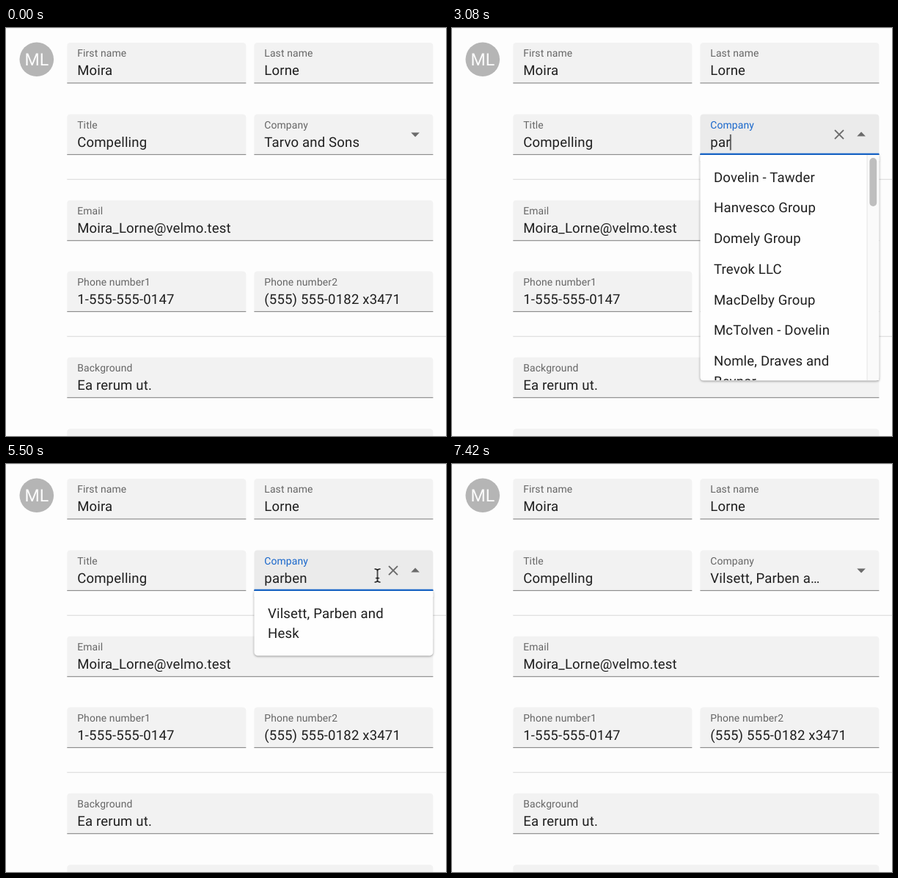
An HTML page for the animation above (8010 ms loop, 600 by 556 pixels).

```html
<!DOCTYPE html>
<html lang="en">
<head>
<meta charset="utf-8">
<title>Contact form</title>
<style>
html, body { margin: 0; width: 100%; height: 100%; overflow: hidden; background: #fdfdfd; }
svg { display: block; width: 600px; height: 556px; }
text {
  font: 18.56px Roboto, Arial, sans-serif;
  letter-spacing: .00938em;
  fill: #1f1f1f;
  white-space: pre;
  text-rendering: geometricPrecision;
}
text.label { font-size: 13.92px; fill: #666; }
text.initials { font-size: 23.2px; letter-spacing: 0; fill: #fcfcfc; text-anchor: middle; }
.popup { filter: drop-shadow(0 1px 1.6px rgba(0, 0, 0, .38)); }
.focus { transform-box: fill-box; transform-origin: center; }
</style>
</head>
<body>
<svg id="stage" viewBox="0 0 600 556"></svg>
<script>
const LOOP = 8010;
const stage = document.getElementById('stage');
const LEFT = 83.3, RIGHT = 338.4, HALF = 244, FULL = 499.1, HEIGHT = 55.5, PAD = 13.9;
const FILL = '#f2f2f2', HOVER = '#e4e4e4', ACTIVE = '#ebebeb';
const LINE = '#8c8c8c', DARK = '#222222', BLUE = '#1967cb', ICON = '#6b6b6b';

// Moments of the story, in ms
const ENTER = 330, PRESS = 1250, OPEN = 1330, FILTER = 5080, RETURN = 5500, PICK = 6420, LEAVE = 7170, GONE = 7330;

function add(tag, attrs, parent = stage) {
  const el = document.createElementNS('http://www.w3.org/2000/svg', tag);
  for (const key in attrs) el.setAttribute(key, attrs[key]);
  parent.append(el);
  return el;
}

function rect(x, y, width, height, fill, parent, more) {
  return add('rect', { x, y, width, height, fill, ...more }, parent);
}

function text(x, y, words, parent, cls = '') {
  const el = add('text', { x, y, class: cls }, parent);
  el.textContent = words;
  return el;
}

// steps: [ms, value, easing towards the next step]
const animations = [];
function play(el, prop, steps) {
  const frames = steps.map(([ms, value, easing = 'step-end']) => ({ offset: ms / LOOP, [prop]: value, easing }));
  frames.push({ offset: 1, [prop]: steps[steps.length - 1][1] });
  animations.push(el.animate(frames, { duration: LOOP, iterations: Infinity }));
}

function show(el, ...spans) {
  const steps = spans[0][0] ? [[0, 0]] : [];
  for (const [from, to] of spans) {
    steps.push([from, 1]);
    if (to < LOOP) steps.push([to, 0]);
  }
  play(el, 'opacity', steps);
}

function shift(el, prop, start, changes, time = 200) {
  const steps = [[0, start]];
  let last = start;
  for (const [ms, value] of changes) {
    steps.push([ms, last, 'ease-out'], [ms + time, value]);
    last = value;
  }
  play(el, prop, steps);
}

function field(x, y, width, label, value) {
  const r = 4.6;
  const box = add('path', {
    d: `M${x} ${y + HEIGHT}v${r - HEIGHT}q0 ${-r} ${r} ${-r}h${width - 2 * r}q${r} 0 ${r} ${r}v${HEIGHT - r}z`,
    fill: FILL
  });
  const line = rect(x, y + HEIGHT - 1.1, width, 1.15, LINE);
  const title = text(x + PAD, y + 19.4, label, stage, 'label');
  if (value) text(x + PAD, y + 44, value);
  return { box, line, title };
}

// Form
rect(0, 0, 600, 1, '#f4f4f4');
add('circle', { cx: 41.8, cy: 42.8, r: 23.3, fill: '#b5b5b5' });
text(41.8, 50.8, 'ML', stage, 'initials');
for (const y of [205.7, 419.7]) rect(LEFT, y, 520, 1.15, '#dcdcdc');

const ROW = [20, 117.5, 234.7, 331.5, 448.7, 546.2];
field(LEFT, ROW[0], HALF, 'First name', 'Moira');
field(RIGHT, ROW[0], HALF, 'Last name', 'Lorne');
field(LEFT, ROW[1], HALF, 'Title', 'Compelling');
const company = field(RIGHT, ROW[1], HALF, 'Company');
const email = field(LEFT, ROW[2], FULL, 'Email', 'Moira_Lorne@velmo.test');
field(LEFT, ROW[3], HALF, 'Phone number1', '1-555-555-0147');
field(RIGHT, ROW[3], HALF, 'Phone number2', '(555) 555-0182 x3471');
field(LEFT, ROW[4], FULL, 'Background', 'Ea rerum ut.');
field(LEFT, ROW[5], FULL, '');

// Company field
shift(company.box, 'fill', FILL, [[ENTER, HOVER], [PRESS, ACTIVE], [PICK, FILL]]);
shift(company.line, 'fill', LINE, [[ENTER, DARK], [PICK, LINE]]);
shift(company.title, 'fill', '#666666', [[PRESS, BLUE], [PICK, '#666666']]);

const focusLine = rect(RIGHT, ROW[1] + HEIGHT - 2.3, HALF, 2.3, BLUE, stage, { class: 'focus' });
shift(focusLine, 'transform', 'scaleX(0)', [[PRESS, 'scaleX(1)'], [PICK, 'scaleX(0)']]);

const textX = RIGHT + PAD, textY = ROW[1] + 44;
const selection = rect(textX, 142, 10, 26.5, '#b5bfca');
show(selection, [OPEN, 2330]);

const typed = [
  [0, 'Tarvo and Sons'], [2330, 'p'], [2830, 'pa'], [3000, 'par'],
  [3500, 'parb'], [3670, 'parbe'], [4000, 'parben'], [PICK, 'Vilsett, Parben a…']
];
const caretSteps = [];
typed.forEach(([from, words], i) => {
  const el = text(textX, textY, words);
  const width = el.getComputedTextLength();
  if (!i) selection.setAttribute('width', width);
  caretSteps.push([from, `translateX(${width}px)`]);
  show(el, [from, i + 1 < typed.length ? typed[i + 1][0] : LOOP]);
});
const caret = rect(textX - .4, 145, 1.3, 21.5, '#1a1a1a');
play(caret, 'transform', caretSteps);
show(caret, [2330, 4500], [5000, 5500], [6000, PICK]);

const clear = add('path', { d: 'M522 139.2l12 12m0-12l-12 12', stroke: ICON, 'stroke-width': 1.9 });
show(clear, [ENTER, PICK]);
const down = add('path', { d: 'M552.3 142.6h11.6l-5.8 5.8z', fill: ICON });
const up = add('path', { d: 'M552.3 147.4h11.6l-5.8-5.8z', fill: ICON });
show(down, [0, OPEN], [PICK, LOOP]);
show(up, [OPEN, PICK]);

// Popups
const OPTION_X = RIGHT + 18.6, FIRST = 209.5, PITCH = 41.76, WRAP = 27.84;
function popup(height) {
  const group = add('g', { class: 'popup' });
  rect(RIGHT, 173, HALF, height, '#fefefe', group, { rx: 4.6 });
  rect(RIGHT, 173, HALF, 8, '#fefefe', group);
  return group;
}

const list = popup(307.5);
const clip = add('clipPath', { id: 'list' });
rect(RIGHT, 173, HALF, 307, '#000', clip);
const options = add('g', { 'clip-path': 'url(#list)' }, list);
const names = [
  'Dovelin - Tawder', 'Hanvesco Group', 'Domely Group', 'Trevok LLC',
  'MacDelby Group', 'McTolven - Dovelin', 'Nomle, Draves and'
];
names.forEach((name, i) => text(OPTION_X, FIRST + i * PITCH, name, options));
text(OPTION_X, FIRST + 6 * PITCH + WRAP, 'Bevnar', options);
rect(565.6, 173, 17, 307, '#fafafa', options);
rect(565.6, 173, 1, 307, '#e7e7e7', options);
rect(569.4, 177, 9.8, 66, '#bebebe', options, { rx: 4.9 });
show(list, [OPEN, FILTER]);

const match = popup(88.2);
const row = rect(RIGHT, 182.3, HALF, 69.6, '#f4f4f4', match);
show(row, [5580, PICK]);
text(OPTION_X, FIRST, 'Vilsett, Parben and', match);
text(OPTION_X, FIRST + WRAP, 'Hesk', match);
show(match, [FILTER, PICK]);

// Pointer passes over the email field on its way out
for (const [el, from, to] of [[email.box, FILL, ACTIVE], [email.line, LINE, DARK]])
  shift(el, 'fill', from, [[LEAVE, to], [LEAVE + 80, from]], 80);

// Pointer
const pointer = add('g', {});
const beam = add('g', { fill: 'none', 'stroke-linecap': 'round' }, pointer);
const beamPath = 'M-3.6 -9q3.6 0 3.6 2.4v13.2q0 2.4 -3.6 2.4M3.6 -9q-3.6 0 -3.6 2.4M0 6.6q0 2.4 3.6 2.4M-2 3.4h4';
add('path', { d: beamPath, stroke: '#fff', 'stroke-width': 3.4 }, beam);
add('path', { d: beamPath, stroke: '#111', 'stroke-width': 1.5 }, beam);

const hand = add('g', { transform: 'translate(-5.5 -1)', fill: '#fff', stroke: '#111', 'stroke-linejoin': 'round' }, pointer);
add('path', {
  d: 'M4.2 3.6C3.6 1 6.6 .4 7.2 2.8L8.4 8C9 6.8 10.9 6.9 11.2 8.3C12 7.2 13.7 7.6 14 8.9C15 8.2 16.6 8.8 16.8 10.2C17.3 13 17.2 15.6 15.6 18L15.4 21 8.4 21.5 8 19.6C5.8 17.8 3.4 15.2 1.6 13C.3 11.4 1.8 9.8 3.4 10.8L5.8 12.6z',
  'stroke-width': 1.4
}, hand);
add('path', { d: 'M9.3 13l.4 4.6M11.6 13l.2 4.6M13.9 13v4.6', 'stroke-width': 1 }, hand);

const arrow = add('path', {
  d: 'M0 0v16.4l3.8-3.6 2.6 6 2.8-1.2-2.6-5.9h5.2z',
  fill: '#111', stroke: '#fff', 'stroke-width': 1.2
}, pointer);

const at = (x, y) => `translate(${x}px, ${y}px)`;
play(pointer, 'transform', [
  [0, at(572, 166)],
  [ENTER, at(572, 166), 'ease-out'],
  [1000, at(506.5, 152)],
  [RETURN, at(506.5, 152), 'ease-in'],
  [5660, at(517, 184), 'ease-out'],
  [5830, at(494.5, 217)],
  [LEAVE, at(494.5, 228), 'linear'],
  [GONE, at(520, 268)]
]);
show(beam, [ENTER, 2330], [RETURN, 5580], [LEAVE, GONE]);
show(hand, [5580, PICK]);
show(arrow, [PICK, LEAVE]);

const start = document.timeline.currentTime || 0;
for (const a of animations) a.startTime = start;
</script>
</body>
</html>
```
